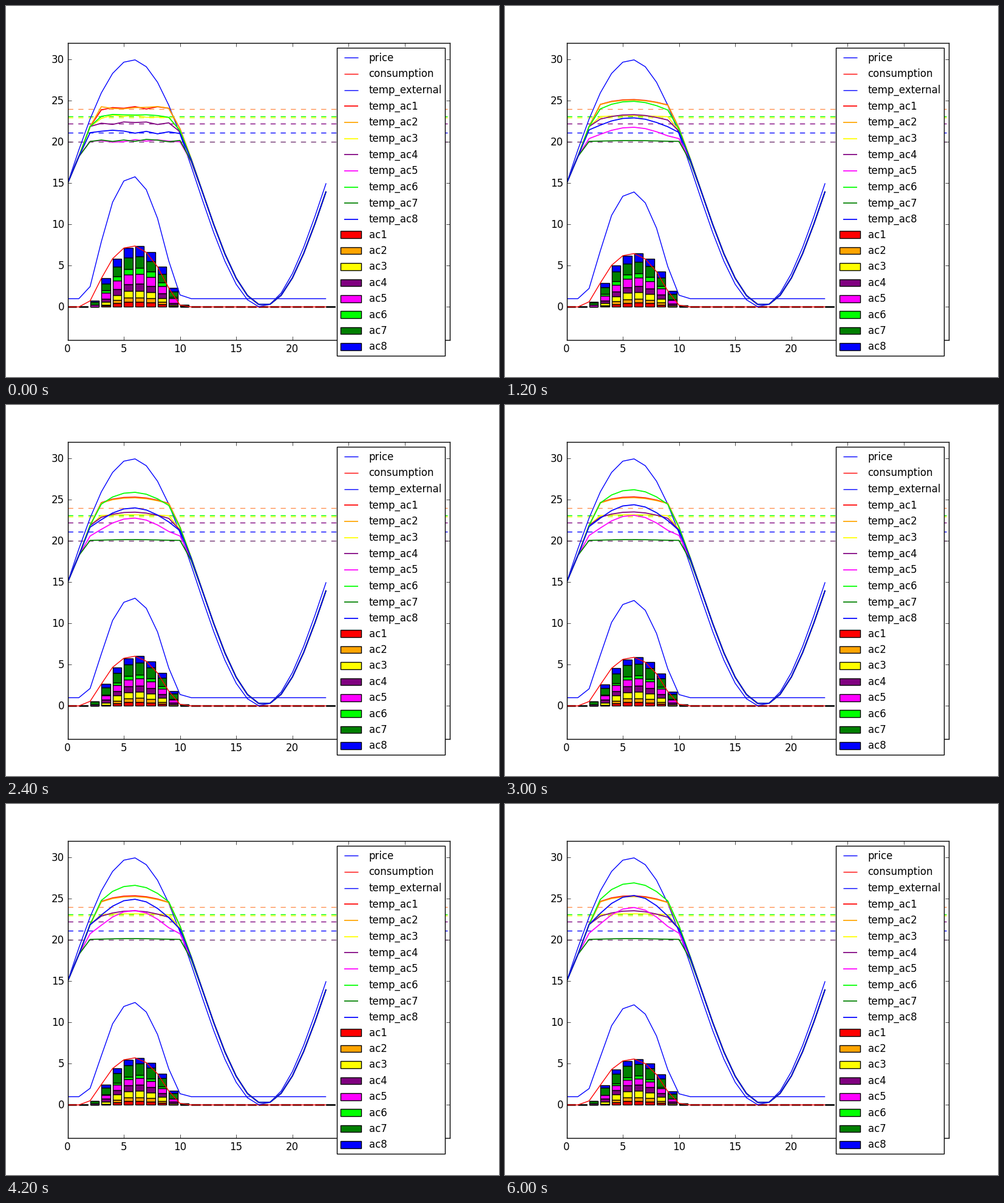
Write a matplotlib script that moves like this. It is 812 by 612 pixels and loops after 6.3 s.

```python
import numpy as np
import matplotlib.pyplot as plt
from matplotlib.animation import FuncAnimation
from matplotlib.patches import Rectangle

W, H, DPI = 812, 612, 100
FRAMES, INTERVAL = 21, 300

plt.rcParams.update({
    "font.family": "DejaVu Sans",
    "font.size": 12,
    "text.hinting": "force_autohint",
    "axes.linewidth": 1.0,
    "lines.linewidth": 1.0,
    "lines.solid_capstyle": "butt",
    "lines.scale_dashes": False,
})

HOURS = np.arange(24)
OUTSIDE = 15 + 15 * np.sin(2 * np.pi * HOURS / 23)

# Colour, set point, final rise above it on hot hours, power per cooled degree
UNITS = [("red", 24.0, 1.45, 0.135), ("orange", 24.0, 1.35, 0.12),
         ("yellow", 23.0, 0.2, 0.148), ("purple", 22.2, 1.5, 0.14),
         ("magenta", 20.05, 4.6, 0.153), ("lime", 23.1, 4.1, 0.137),
         ("green", 20.05, 0.15, 0.182), ("blue", 21.1, 4.95, 0.172)]
COLORS = [u[0] for u in UNITS]
ROOM_WIDTH = 1.25

# Early control noise, only while cooling
NOISE = np.random.default_rng(4).uniform(-0.22, 0.22, (8, 24))
NOISE[:, :3] = 0


def simulate(n):
    """Return temperatures and power use, one row per unit."""
    temps = np.full((8, 24), 15.0)
    power = np.zeros((8, 24))
    for k, (_, level, rise, rate) in enumerate(UNITS):
        drift = rise * (1 - np.exp(-(n + 0.3) / (1.6 * rise)))
        for t in range(1, 24):
            free = 0.2 * temps[k, t - 1] + 0.8 * OUTSIDE[t]
            goal = level + drift * np.interp(free, [22, 25, 29.5], [0.18, 0.45, 1])
            goal += NOISE[k, t] * np.exp(-n)
            temps[k, t] = min(free, goal)
            power[k, t] = rate * (free - temps[k, t])
    return temps, power


fig = plt.figure(figsize=((W + 0.01) / DPI, (H + 0.01) / DPI), dpi=DPI, facecolor="white")
ax = fig.add_axes([0.125, 0.1, 0.775, 0.8])
ax.set(xticks=range(0, 31, 5), yticks=range(0, 31, 5))
ax.tick_params(direction="in", top=True, right=True, length=4, width=0.5,
               labelbottom=False, labelleft=False)

# Overlay in pixels, y pointing down
top = fig.add_axes([0, 0, 1, 1], zorder=5)
top.set(xlim=(0, W), ylim=(H, 0))
top.axis("off")


def put(x, y, text, ha="left"):
    top.text(x, y, text, ha=ha, va="baseline", zorder=6)


def draw_tick_labels():
    for v in range(0, 31, 5):
        put(95.9, 502.4 - 13.6 * v, str(v), "right")
        if v <= 20:
            put(101.3 + 18.509 * v, 571, str(v), "center")


def draw_levels():
    # Shared set points show as a blend
    blends = {24.0: "#ff9050", 20.05: "#703070"}
    for level, color in {u[1]: u[0] for u in UNITS}.items():
        ax.axhline(level, color=blends.get(level, color), dashes=(6, 6),
                   dash_capstyle="butt", zorder=1.5)


def draw_legend():
    top.add_patch(Rectangle((545, 69.5), 177.7, 507.5, fc="white", ec="black", lw=1, zorder=4))
    lines = [("price", "blue", 1), ("consumption", "red", 1), ("temp_external", "blue", 1)]
    lines += [(f"temp_ac{k}", c, ROOM_WIDTH) for k, c in enumerate(COLORS, 1)]
    for i, (name, color, width) in enumerate(lines):
        base = 91.05 + 26.667 * i
        top.plot([556.5, 580], [base - 5.83] * 2, color=color, lw=width, zorder=5)
        put(597.5, int(base), name)
    for i, color in enumerate(COLORS):
        base = 383.1 + 26.4 * i
        top.add_patch(Rectangle((551.3, base - 11.67), 33.3, 11.67, fc=color, ec="black",
                                lw=1, zorder=5))
        put(597.5, int(base), f"ac{i + 1}")


draw_tick_labels()
draw_levels()
draw_legend()

bars = [ax.bar(HOURS, np.zeros(24), 0.8, align="edge", color=c, edgecolor="black",
               linewidth=1, zorder=1) for c in COLORS]
price, = ax.plot(HOURS, HOURS, color="blue")
usage, = ax.plot(HOURS, HOURS, color="red")
ax.plot(HOURS, OUTSIDE, color="blue")
rooms = [ax.plot(HOURS, HOURS, color=c, lw=ROOM_WIDTH)[0] for c in COLORS]
ax.set(xlim=(0, 34), ylim=(-4, 32))


def update(n):
    temps, power = simulate(n)
    base = np.zeros(24)
    for k in range(8):
        rooms[k].set_ydata(temps[k])
        for bar, y, h in zip(bars[k], base, power[k]):
            bar.set_y(y)
            bar.set_height(h)
        base = base + power[k]
    usage.set_ydata(base)
    price.set_ydata(1 + 2 * base)
    return []


anim = FuncAnimation(fig, update, frames=FRAMES, interval=INTERVAL, repeat=True,
                     repeat_delay=0, blit=False)
plt.show()
```
